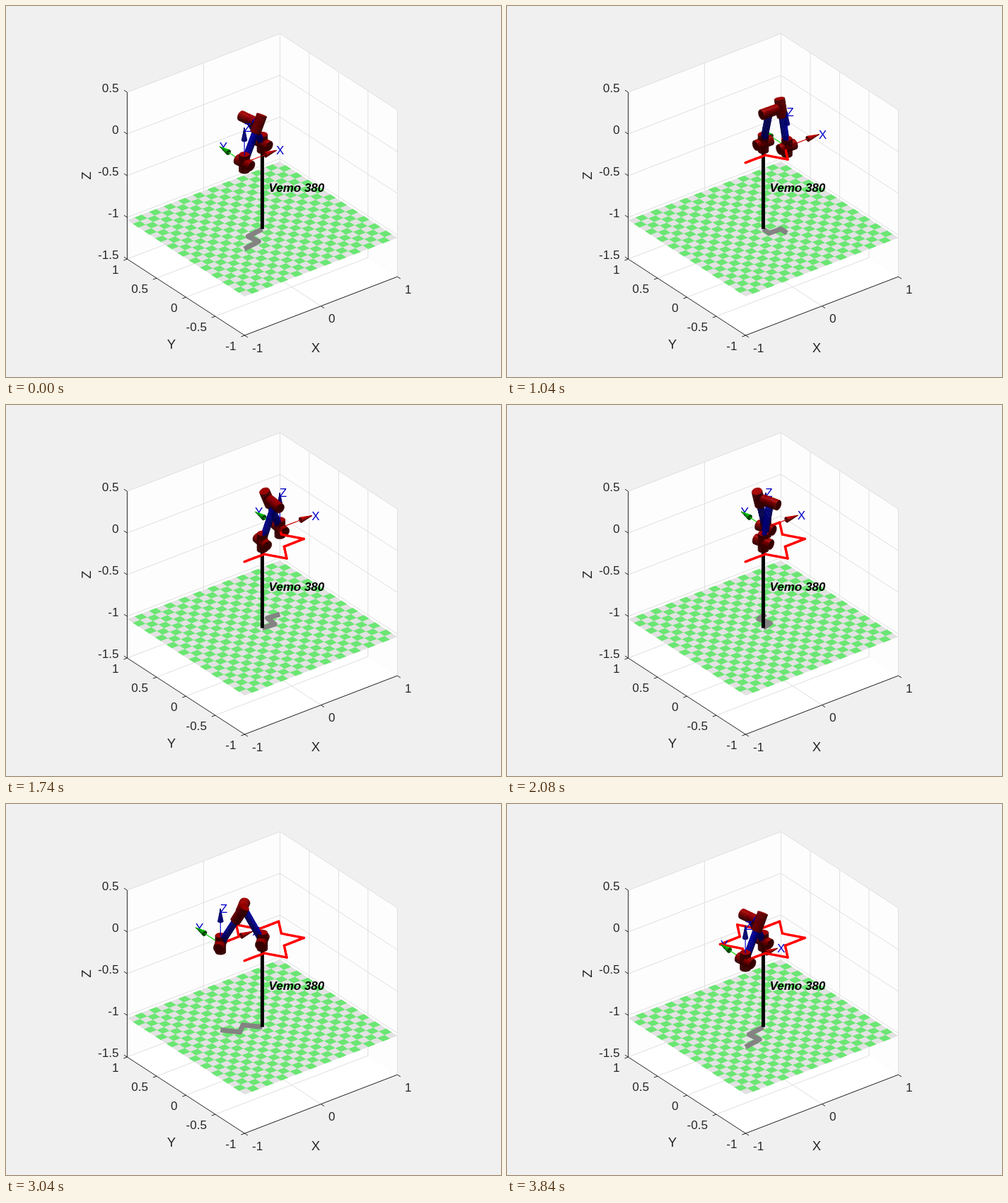
Animation, 700 px wide and 525 px high, one loop 3.94 s. Source, as an HTML page:

```html
<!DOCTYPE html>
<html lang="en">
<head>
<meta charset="utf-8">
<title>Robot arm tracing a star</title>
<style>
html, body { margin: 0; width: 100%; height: 100%; overflow: hidden; background: #f0f0f0; }
svg { display: block; width: 100vw; height: 100vh; font-family: "Liberation Sans", Arial, sans-serif; }
</style>
</head>
<body>
<svg viewBox="0 0 700 525">
  <g id="scene"></g>
  <g id="robot"></g>
  <text x="371.5" y="263" font-size="17" font-weight="bold" font-style="italic">Vemo 380</text>
</svg>
<script>
const LOOP = 3940, STEP = 20;
const FLOOR = -1.034, TILES = 21;
const LINK = 0.4318, OFFSET = 0.15;
const JOINT_R = 0.054, JOINT_H = 0.1, LINK_R = 0.035;
const RED = [0.7, 0, 0], BLUE = [0, 0, 1];
const VIEW = [-0.527, -0.687, 0.5];
const UP = [0, 0, 1];

// time in ms, star corners passed
const KEYS = [[80, 0], [680, 1.8], [1400, 4.38], [2080, 6.7], [2500, 8], [3040, 9.93], [3840, 12]];

// vectors
const add = (a, b, k = 1) => a.map((v, i) => v + b[i] * k);
const dot = (a, b) => a[0] * b[0] + a[1] * b[1] + a[2] * b[2];
const cross = (a, b) => [a[1] * b[2] - a[2] * b[1], a[2] * b[0] - a[0] * b[2], a[0] * b[1] - a[1] * b[0]];
const unit = a => a.map(v => v / Math.hypot(...a));
const mix = (a, b, k) => a.map((v, i) => v + (b[i] - v) * k);

const project = ([x, y, z]) => [362.4 + 108 * x - 83 * y, 193.6 - 41.5 * x - 54 * y - 118 * z];
const pt = p => project(p).map(v => v.toFixed(1)).join(" ");
const pathOf = pts => "M" + pts.map(pt).join("L");
const line = (pts, color, width = 1, more = "") =>
  `<path d="${pathOf(pts)}" fill="none" stroke="${color}" stroke-width="${width}" ${more}/>`;
const label = (x, y, s, more = "") => `<text x="${x}" y="${y}" ${more}>${s}</text>`;

function drawScene() {
  const grid = [], axes = [], texts = [];
  const plane = (pts, fill) => `<path d="${pathOf(pts)}Z" fill="${fill}"/>`;
  const rule = (...pts) => grid.push(line(pts, "#dfdfdf"));
  const square = z => [[-1, -1, z], [1, -1, z], [1, 1, z], [-1, 1, z]];
  const tick = (p, dx, dy) => {
    const [x, y] = project(p);
    axes.push(`<path d="M${x} ${y}l${dx} ${dy}" stroke="#262626"/>`);
    return [x, y];
  };

  for (const z of [-1, -0.5, 0, 0.5]) rule([-1, 1, z], [1, 1, z], [1, -1, z]);
  rule([0, -1, -1.5], [0, 1, -1.5], [0, 1, 0.5]);
  for (const y of [1, 0.5, 0, -0.5, -1]) rule([-1, y, -1.5], [1, y, -1.5], [1, y, 0.5]);

  let tiles = "";
  const at = i => -1 + 2 * i / TILES;
  for (let i = 0; i < TILES; i++) for (let j = 1 - i % 2; j < TILES; j += 2) {
    const x = at(i), y = at(j), x2 = at(i + 1), y2 = at(j + 1);
    tiles += pathOf([[x, y, FLOOR], [x2, y, FLOOR], [x2, y2, FLOOR], [x, y2, FLOOR]]) + "Z";
  }

  axes.push(line([[-1, 1, 0.5], [-1, 1, -1.5], [-1, -1, -1.5], [1, -1, -1.5]], "#262626"));
  for (const z of [0.5, 0, -0.5, -1, -1.5]) {
    const [x, y] = tick([-1, 1, z], -4.5, -2.9);
    texts.push(label(x - 12, y - 0.5, z, 'text-anchor="end"'));
  }
  for (const v of [1, 0.5, 0, -0.5, -1]) {
    const [x, y] = tick([-1, v, -1.5], -5, 1.9);
    texts.push(label(x - 12, y + 21.3, v, 'text-anchor="end"'));
  }
  for (const v of [-1, 0, 1]) {
    const [x, y] = tick([v, -1, -1.5], 4.5, 2.9);
    texts.push(label(x + 10.6, y + 23.6, v));
  }
  const title = 'text-anchor="middle" font-size="18.5"';
  texts.push(label(438, 490, "X", title), label(234, 484.5, "Y", title),
    label(0, 0, "Z", title + ' transform="translate(120 240) rotate(-90)"'));

  document.getElementById("scene").innerHTML =
    '<rect width="700" height="525" fill="#f0f0f0"/>' +
    plane(square(-1.5), "#fff") +
    plane([[-1, 1, 0.5], [1, 1, 0.5], [1, -1, 0.5], [1, -1, -1.5], [1, 1, -1.5], [-1, 1, -1.5]], "#fdfdfd") +
    grid.join("") + plane(square(FLOOR), "#e2e2e2") + `<path d="${tiles}" fill="#6be673"/>` +
    axes.join("") + `<g fill="#262626" font-size="17">${texts.join("")}</g>`;
}

// parts of the moving scene, painted from back to front
let parts = [];
const put = (p, markup) => parts.push([dot(p, VIEW), markup]);

function shade(n, color) {
  const nz = Math.max(0, n[2]);
  const mirror = add(n.map(v => 2 * nz * v), UP, -1);
  const shine = nz ? 0.4 * Math.max(0, dot(mirror, VIEW)) ** 10 : 0;
  return "rgb(" + color.map(c => Math.min(255, Math.round(255 * (c * (0.3 + 0.6 * nz) + shine)))).join() + ")";
}

function face(pts, n, color) {
  if (dot(n, VIEW) <= 0) return;
  const mid = pts.reduce((a, b) => add(a, b)).map(v => v / pts.length);
  const c = shade(n, color);
  put(mid, `<path d="${pathOf(pts)}Z" fill="${c}" stroke="${c}" stroke-width=".5"/>`);
}

// round solid from a to b; a zero end radius gives a cone
function tube(a, b, r, color, endR = r, sides = 20) {
  const length = Math.hypot(...add(b, a, -1));
  const axis = unit(add(b, a, -1));
  const u = unit(cross(axis, Math.abs(axis[2]) > 0.9 ? [1, 0, 0] : UP));
  const w = cross(axis, u);
  const slices = endR ? Math.ceil(length / 0.04) : 1;
  const out = i => {
    const q = i * 2 * Math.PI / sides;
    return add(u.map(v => v * Math.cos(q)), w, Math.sin(q));
  };
  const rim = (i, k) => add(mix(a, b, k), out(i), r + (endR - r) * k);
  const ring = k => Array.from({ length: sides }, (_, i) => rim(i, k));
  for (let i = 0; i < sides; i++) {
    const n = unit(add(out(i + 0.5), axis, (r - endR) / length));
    for (let j = 0; j < slices; j++) {
      const k = j / slices, l = (j + 1) / slices;
      face([rim(i, k), rim(i + 1, k), rim(i + 1, l), rim(i, l)], n, color);
    }
  }
  face(ring(0), axis.map(v => -v), color);
  if (endR) face(ring(1), axis, color);
}

const joint = (p, axis) => tube(add(p, axis, -JOINT_H), add(p, axis, JOINT_H), JOINT_R, RED);

function arrow(origin, axis, name, color, css) {
  const tip = add(origin, axis, 0.42), neck = add(origin, axis, 0.27);
  for (let i = 0; i < 6; i++) {
    const a = mix(origin, neck, i / 6), b = mix(origin, neck, (i + 1) / 6);
    put(mix(a, b, 0.5), line([a, b], css, 1.2));
  }
  tube(neck, tip, 0.029, color, 0, 14);
  const [x, y] = project(tip);
  put(tip, label(x - 0.5, y + 6, name, 'fill="#0000c8" font-size="17"'));
}

function corner(i) {
  const q = (-150 + 30 * i) * Math.PI / 180, inner = i % 2;
  return [(inner ? 0.26 : 0.45) * Math.cos(q) - 0.01, (inner ? 0.25 : 0.43) * Math.sin(q), 0];
}
const star = s => mix(corner(Math.floor(s)), corner(Math.floor(s) + 1), s % 1);

function progress(t) {
  if (t < 100) return 0;
  for (let i = 1; i < KEYS.length; i++) {
    const [t0, s0] = KEYS[i - 1], [t1, s1] = KEYS[i];
    if (t <= t1) return s0 + (s1 - s0) * (t - t0) / (t1 - t0);
  }
  return 12;
}

function drawRobot(t) {
  const s = progress(t);
  const base = [0, 0, 0], wrist = star(s);
  const reach = Math.hypot(wrist[0], wrist[1]);
  const turn = Math.atan2(wrist[1], wrist[0]) + Math.acos(OFFSET / reach);
  const side = [Math.cos(turn), Math.sin(turn), 0];
  const half = Math.sqrt(reach * reach - OFFSET * OFFSET) / 2;
  const elbow = [half * Math.sin(turn), -half * Math.cos(turn), Math.sqrt(LINK * LINK - half * half)];
  const fore = add(elbow, side, OFFSET);

  parts = [];
  tube(base, elbow, LINK_R, BLUE);
  tube(elbow, fore, LINK_R, BLUE);
  tube(fore, wrist, LINK_R, BLUE);
  joint(base, UP);
  joint(base, side);
  joint(elbow, side);
  joint(fore, unit(add(fore, wrist, -1)));
  joint(wrist, side);
  joint(wrist, UP);
  arrow(wrist, [1, 0, 0], "X", [0.9, 0, 0], "#d00000");
  arrow(wrist, [0, 1, 0], "Y", [0, 0.85, 0], "#00d800");
  arrow(wrist, UP, "Z", [0, 0, 1], "#0000d0");
  for (let k = 0; k < s; k += 0.25) {
    const a = star(k), b = star(Math.min(s, k + 0.25));
    put(mix(a, b, 0.5), line([a, b], "#f00", 3.4, 'stroke-linecap="round"'));
  }
  parts.sort((a, b) => a[0] - b[0]);

  const ground = [base, elbow, fore, wrist].map(p => [p[0], p[1], FLOOR]);
  document.getElementById("robot").innerHTML =
    line(ground, "#848282", 7, 'stroke-linejoin="round"') +
    line([[0, 0, FLOOR], base], "#000", 5) +
    parts.map(p => p[1]).join("");
}

let last = -1;
function tick(now) {
  const t = Math.floor((now % LOOP) / STEP) * STEP;
  if (t !== last) drawRobot(last = t);
  requestAnimationFrame(tick);
}

drawScene();
drawRobot(0);
requestAnimationFrame(tick);
</script>
</body>
</html>
```
